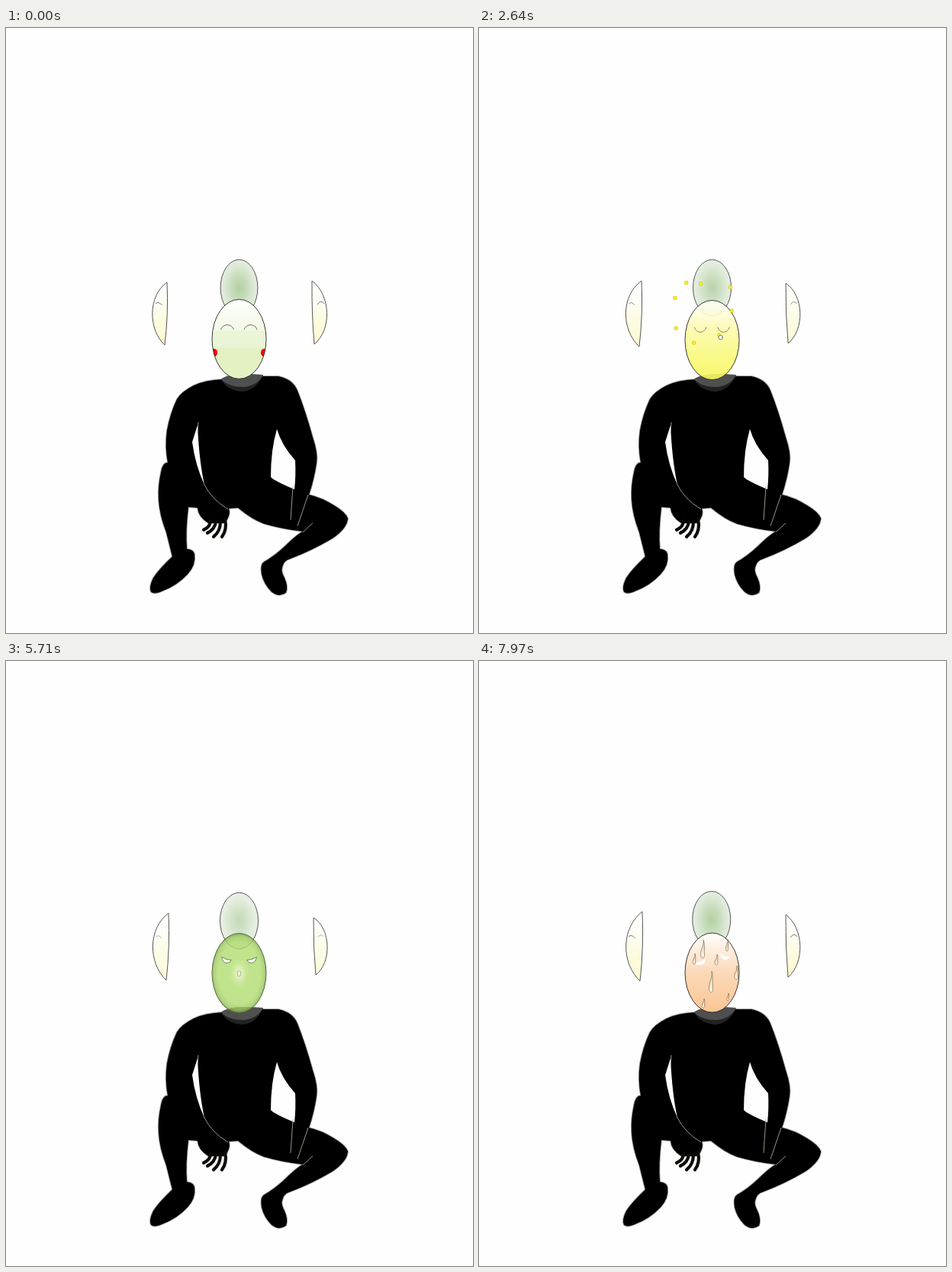
Animation of 612 by 792 pixels, one loop 8 s. Source, as an HTML page with a canvas:

```html
<!DOCTYPE html>
<html lang="en">
<head>
<meta charset="utf-8">
<title>Changing faces</title>
<style>
html, body { margin: 0; width: 100%; height: 100%; overflow: hidden; background: #fefefe; }
canvas { display: block; }
</style>
</head>
<body>
<canvas id="stage" width="612" height="792"></canvas>
<script>
const LOOP = 8000;
const ctx = document.getElementById('stage').getContext('2d');

const clamp = v => Math.max(0, Math.min(1, v));
const ramp = (t, from, to) => clamp((t - from) / (to - from));
const lerp = (a, b, p) => a + (b - a) * p;
const mix = (a, b, p) => `rgb(${a.map((v, i) => Math.round(lerp(v, b[i], p)))})`;

const silhouette = new Path2D(`M283 460 Q261 461 246 468 Q230 476 224 486 Q215 505 211 527
  Q208 548 212 569 Q205 569 203 582 Q199 600 200 617 Q201 637 210 660 L218 692
  Q200 709 193 720 Q187 732 190 738 Q194 742 205 737 Q224 730 238 715 Q249 703 247 689
  Q246 683 237 682 Q235 660 239 627 L251 628 Q252 640 265 648 L285 648 Q289 646 291 641
  Q294 635 292 629 L304 628 Q322 643 338 649 Q362 656 389 659 Q380 664 366 678 Q351 692 338 699
  Q333 702 335 715 Q338 728 348 738 Q358 746 367 739 Q370 731 365 720 Q360 711 362 706
  Q364 697 372 695 Q401 684 428 668 Q447 655 448 642 Q445 634 430 625 Q414 615 397 611
  Q404 590 407 569 Q409 557 402 536 Q392 500 382 475 Q376 460 357 456 L335 456 Z`);
const fingers = new Path2D(`M268 645 Q268 653 259 657 M275 646 Q274 656 264 661
  M281 646 Q281 659 272 666 M287 643 Q290 657 283 666`);
const gaps = new Path2D(`M244 542 L251 520 Q253 566 260 598 Q248 572 244 542 Z
  M355 525 Q347 552 347 588 Q352 593 378 604 Q380 586 379 566 Q361 546 355 525 Z`);
const seams = new Path2D(`M252 516 L251 530 M259 596 Q269 617 291 630
  M376 600 L373 644 M396 611 L382 652 M402 648 L389 660`);
const collar = new Path2D('M282 460 Q290 453 312 453 L337 454 Q328 475 309 476 Q289 474 282 460 Z');
const collarTop = new Path2D('M282 460 Q290 453 312 453 L337 454 Q330 468 312 470 Q291 470 282 460 Z');
const glare = new Path2D('M-8 -5 Q0 0 8 0 Q6 5 0 5 Q-7 4 -8 -5 Z');
const worriedEyes = new Path2D(`M282 395 Q291 394 297 390 Q296 398 289 398 Q284 398 282 395 Z
  M315 382 Q320 387 329 387 Q327 391 322 391 Q316 389 315 382 Z`);

// landing x, y; start x, y; departure and arrival times; scatter x, y
const petals = [
  [282.5, 368, 156, 264, 30, 400, 5, 210],
  [286, 364, 157, 300, 200, 620, 130, 33],
  [289.5, 365.5, 156, 335, 430, 830, 300, 33],
  [302, 359.5, 507, 163, 870, 1150, 599, 140],
  [304, 359, 507, 235, 900, 1200, 599, 480],
  [284, 372, 200, 620, 1260, 1600, 5, 600],
  [304, 363, 485, 365, 1300, 1670, 420, 788],
  [290, 374, 225, 586, 1700, 1970, 200, 788]
];

// x, y, half height, half width, fall start, fall end
const drops = [
  [293, 377, 12, 2.6, 6850, 7170], [325, 372, 8, 1.5, 7200, 7450],
  [282, 390, 7, 1.8, 7260, 7530], [311, 391, 7, 2, 7330, 7610],
  [337, 408, 9, 2.3, 7400, 7690], [304, 420, 14, 2.4, 7470, 7780],
  [294, 448, 6, 1.8, 7560, 7880], [326, 440, 5, 1.2, 7650, 7970]
];

function ink(path, color = '#222', width = .9) {
  ctx.strokeStyle = color;
  ctx.lineWidth = width;
  ctx.stroke(path);
}

function paint(path, fill, alpha = 1) {
  ctx.globalAlpha = alpha;
  ctx.fillStyle = fill;
  ctx.fill(path);
  ctx.globalAlpha = 1;
}

function oval(x, y, rx, ry) {
  const path = new Path2D();
  path.ellipse(x, y, rx, ry, 0, 0, 7);
  return path;
}

function fade(top, bottom, stops) {
  const g = ctx.createLinearGradient(0, top, 0, bottom);
  stops.forEach(([at, color]) => g.addColorStop(at, color));
  return g;
}

// Radial gradient stretched over an oval
function radial(x, y, rx, ry, stops, alpha) {
  const g = ctx.createRadialGradient(0, 0, 0, 0, 0, 1);
  stops.forEach(([at, color]) => g.addColorStop(at, color));
  ctx.save();
  ctx.translate(x, y);
  ctx.scale(rx, ry);
  paint(oval(0, 0, 1, 1), g, alpha);
  ctx.restore();
}

function around(x, y, scale, alpha, draw, flip = 1) {
  if (alpha <= 0) return;
  ctx.save();
  ctx.translate(x, y);
  ctx.scale(scale * flip, scale);
  ctx.globalAlpha = alpha;
  draw();
  ctx.restore();
}

function drawBody() {
  paint(silhouette, '#000');
  ink(silhouette, 'rgba(0,0,0,.4)', 1.8);
  ctx.lineCap = 'round';
  ink(fingers, '#0c0b08', 4.2);
  ctx.lineCap = 'butt';
  paint(gaps, '#fefefe');
  ink(seams, '#aaa598', .9);
  paint(collar, '#222');
  paint(collarTop, '#4f4f4f');
}

function drawEars(t, a) {
  const first = ramp(t, 0, 830), second = ramp(t, 2570, 3370), late = t >= 6370;
  const grow = late ? 5 : 2 * first + second;
  const lx = late ? 214 : 211 + 2 * first;
  const ltop = 333 - grow, lbot = late ? 419 : 415 + grow;
  const shift = late ? 1 : first + second;
  const rx = 401 + shift, rtop = late ? 332 : 331 + 3 * first + 2 * second;
  const rbot = late ? 414 : 414 - first - 2 * second;
  const left = new Path2D(`M${lx} ${ltop} C186 350 186 395 ${lx - 3} ${lbot} Q${lx + 2} 375 ${lx} ${ltop} Z`);
  const right = new Path2D(`M${rx} ${rtop} C426 350 427 395 ${rx + 3} ${rbot} Q${rx - .5} 375 ${rx} ${rtop} Z`);
  const fill = fade(330, 418, [[0, '#fff'], [.3, '#fefef6'], [.6, '#fdfbdf'], [1, '#fdfad0']]);
  for (const ear of [left, right]) {
    paint(ear, fill, a);
    ink(ear, '#444', .9);
  }
  around(200, 361, a, a, () => ink(new Path2D('M-4 0 Q0 -4 4.5 2'), '#777', 1));
  around(412, 360, a, a, () => ink(new Path2D('M-4 2 Q1 -5 5 1'), '#777', 1));
}

function drawCrown(t, a) {
  const late = t >= 6370, p = ramp(t, 0, 830);
  const x = late ? 304.7 : 305.5, y = late ? 338.3 : 340;
  const rx = lerp(24.4, 25, p), ry = 36.8;
  radial(x, y, rx, ry, [[0, '#b4d0a4'], [.35, '#c3dab6'], [.8, '#dde9d7'], [1, '#e4ede0']], a);
  ink(oval(x, y, rx, ry), '#444');
}

function drawCalmFace(t, a, face) {
  const p = ramp(t, 0, 830);
  const greens = [[242, 248, 229], [234, 244, 215], [227, 241, 195]];
  const yellows = [[252, 250, 170], [250, 249, 126], [248, 247, 92]];
  const c = greens.map((g, i) => mix(g, yellows[i], p));
  // Green shows three bands; yellow is one smooth slope
  paint(face, fade(355, 460, [[0, '#fff'], [.39, c[0]], [lerp(.402, .7, p), c[1]],
    [lerp(.6, .7, p), c[1]], [lerp(.612, 1, p), c[2]], [1, c[2]]]), a);
  if (p < 1) {
    ctx.save();
    ctx.clip(face);
    for (const x of [272.5, 338.5]) paint(oval(x, 425, 4.6, 5.3), '#f50808', 1 - p);
    ctx.restore();
  }
  const bend = lerp(-8.4, 9.8, p), rise = lerp(395, 391.5, p);
  for (const x of [290, 320.5])
    around(x, rise, a, a, () => ink(new Path2D(`M-8.5 0 C-6 ${bend} 6 ${bend} 8.5 0`), '#666', 1));
}

function drawAngryFace(t, a) {
  const x = 305.5, y = 409;
  radial(305.5, 408.5, 35.5, 52, [[0, '#b1de6f'], [.78, '#aedb6c'], [.92, '#9ccb5d'], [1, '#7fa24d']], a);
  if (t >= 4240 && t < 5160) {
    const r = 2.5 + 28.5 * Math.pow(ramp(t, 4240, 5040), .46);
    for (const k of [1, .79, .58]) ink(oval(x, y, r * k, r * k * 1.5), '#55802c', 1);
    radial(x, y, r * .42, r * .64, [[0, '#fafdf2'], [.5, '#e4f2c8'], [1, '#b6de79']], 1);
    ink(oval(x, y, r * .42, r * .64), '#55802c', 1);
  } else {
    radial(x, y, 15, 23, [[0, 'rgba(250,252,238,1)'], [.35, 'rgba(232,245,205,.75)'], [1, 'rgba(190,226,130,0)']], a);
    around(x, y, a, a, () => ink(oval(0, 0, 3, 4.8), '#8d9b80', 1.1));
  }
  for (const side of [-1, 1])
    around(x + side * 16.5, 391.5, a, a, () => {
      ctx.fillStyle = '#fff';
      ctx.fill(glare);
      ink(glare, '#3c4a2c', 1);
    }, -side);
}

function drawWorriedFace(a, face) {
  paint(face, fade(355, 460, [[0, '#fff'], [.2, '#feefe2'], [.5, '#fcd9b9'], [1, '#fbc593']]), a);
  paint(worriedEyes, '#fff', clamp(a * 1.8));
}

function drawPetals(t) {
  if (t > 3340) return;
  const out = ramp(t, 2570, 3340);
  for (const [x, y, sx, sy, start, end, ex, ey] of petals) {
    if (t < start) continue;
    const p = ramp(t, start, end);
    const petal = oval(lerp(lerp(sx, x, p), ex, out), lerp(lerp(sy, y, p), ey, out), 2.4, 2.4);
    paint(petal, '#f7ee26');
    ink(petal, '#cdbd18', .6);
  }
  if (t > 830 && out < 1) {
    const core = oval(lerp(288, 598, out), lerp(369, 760, out), 2.8, 2.8);
    paint(core, '#f4f4f4');
    ink(core, '#777', 1);
  }
}

function drawDrops(t) {
  for (const [x, y, h, w, start, end] of drops) {
    if (t < start) continue;
    const top = start < 7170 ? 10 : 0;
    const drop = new Path2D(`M1 ${-h} C${w + 1} ${-h * .3} ${w * .6} 0 ${w} ${h * .55}
      C${w} ${h * 1.15} ${-w} ${h * 1.15} ${-w} ${h * .5} C${-w} 0 ${w * .8} ${-h * .3} 1 ${-h} Z`);
    around(x, lerp(top + h, y, ramp(t, start, end)), 1, 1, () => {
      ctx.fillStyle = fade(-h, h, [[0, '#f3d9b8'], [.6, '#f5e8cb'], [1, '#fffdf0']]);
      ctx.fill(drop);
      ink(drop, '#8b7a60', .8);
    });
  }
}

function draw() {
  const t = performance.now() % LOOP;
  const angry = t >= 3385 && t < 6355;
  const a = t < 3385 ? 1 - ramp(t, 2570, 3360)
    : t < 5540 ? ramp(t, 3400, 4200)
    : angry ? 1 - ramp(t, 5540, 6340)
    : ramp(t, 6370, 7170);
  const y = t < 6370 ? lerp(407.3, 408.5, ramp(t, 0, 830)) : 408;
  const face = oval(305.5, y, 35.5, 52);

  ctx.fillStyle = '#fefefe';
  ctx.fillRect(0, 0, 612, 792);
  drawBody();
  drawCrown(t, a);
  if (angry) drawAngryFace(t, a);
  else if (t < 3385) drawCalmFace(t, a, face);
  else drawWorriedFace(a, face);
  ink(face, angry ? mix([34, 34, 34], [88, 116, 50], a) : '#222');
  drawEars(t, a);
  drawPetals(t);
  drawDrops(t);
  requestAnimationFrame(draw);
}
draw();
</script>
</body>
</html>
```
